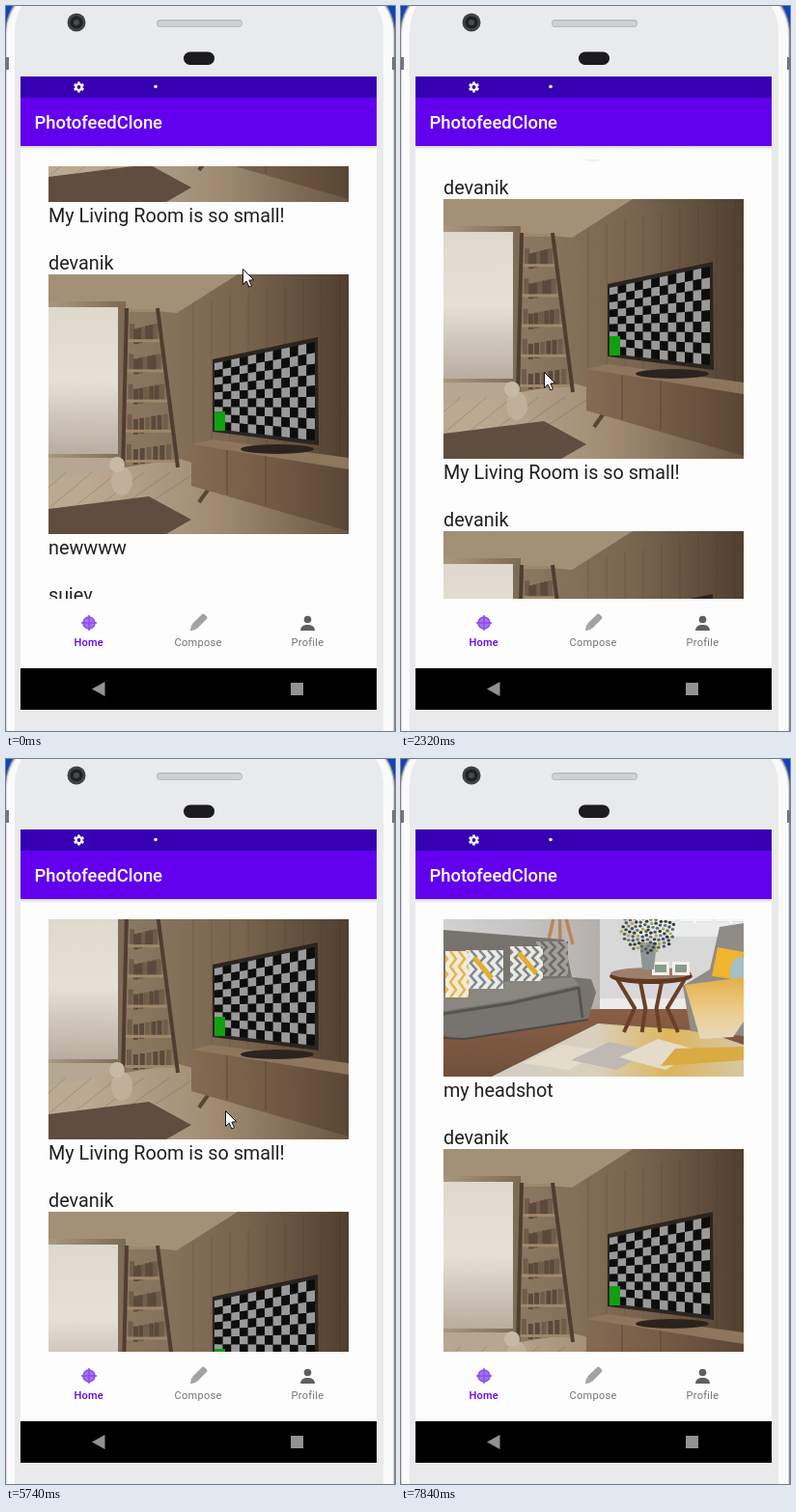
Recreate the animation shown at these times as an HTML page with a canvas. Size 403x751 px, loop 7990 ms.

```html
<!DOCTYPE html>
<html lang="en">
<head>
<meta charset="utf-8">
<title>Photo feed</title>
<style>
html, body { margin: 0; width: 100%; height: 100%; overflow: hidden; background: #e9eaec; }
canvas { display: block; width: 403px; height: 751px; }
</style>
</head>
<body>
<canvas id="stage" width="403" height="751"></canvas>
<script>
const LOOP = 7990, IMG_W = 311, IMG_H = 269, PITCH = 344, LEFT = 44;
const stage = document.getElementById('stage').getContext('2d');
let g = stage;

// ---------- drawing helpers ----------
const mix = (a, b, k) => a + (b - a) * k;
function repeat(n, paint) { for (let i = 0; i < n; i++) paint(i, i / (n - 1)); }
function rect(x, y, w, h, fill) { g.fillStyle = fill; g.fillRect(x, y, w, h); }
function tracePath(points) {
  g.beginPath();
  for (let i = 0; i < points.length; i += 2) g.lineTo(points[i], points[i + 1]);
}
function poly(fill, ...points) { tracePath(points); g.closePath(); g.fillStyle = fill; g.fill(); }
function line(color, width, ...points) {
  tracePath(points);
  g.strokeStyle = color; g.lineWidth = width; g.stroke();
}
function oval(x, y, rx, ry, fill) {
  g.beginPath(); g.ellipse(x, y, rx, ry, 0, 0, 7); g.fillStyle = fill; g.fill();
}
function round(x, y, w, h, r, fill) {
  g.beginPath(); g.roundRect(x, y, w, h, r); g.fillStyle = fill; g.fill();
}
function shade(x0, y0, x1, y1, ...colors) {
  const grad = g.createLinearGradient(x0, y0, x1, y1);
  colors.forEach((c, i) => grad.addColorStop(i / (colors.length - 1), c));
  return grad;
}
function label(text, x, y, font, color, spacing = 0) {
  g.font = font + ' Roboto, sans-serif';
  g.letterSpacing = spacing + 'px';
  g.fillStyle = color;
  g.fillText(text, x, y);
}
function clipped(x, y, w, h, paint) {
  g.save();
  g.beginPath(); g.rect(x, y, w, h); g.clip();
  paint();
  g.restore();
}
function offscreen(w, h, paint) {
  const c = document.createElement('canvas');
  c.width = w; c.height = h;
  g = c.getContext('2d');
  paint();
  g = stage;
  return c;
}

// ---------- pictures ----------
function paintTvRoom() {
  rect(0, 0, IMG_W, IMG_H, shade(90, 0, 311, 0, '#8b7760', '#79644e', '#513f30'));
  poly('#a39077', 0, 0, 196, 0, 133, 40, 0, 28);
  repeat(9, i => line('rgba(50,35,22,.15)', 1, 150 + i * 19, 30 - i * 4, 150 + i * 19, 190));
  rect(0, 28, 80, 190, shade(0, 0, 80, 0, '#a8987f', '#7c6953'));
  rect(0, 34, 72, 152, shade(0, 34, 0, 186, '#ded8cd', '#e6e0d6', '#b8ad9f'));
  rect(0, 190, 76, 26, '#b5a792');

  // floor and rug
  poly(shade(40, 0, 311, 0, '#bbaa92', '#a08b72', '#6b5643'), 0, 213, 135, 191, 311, 240, 311, 269, 0, 269);
  repeat(6, i => line('rgba(90,70,50,.25)', 1, i * 27 - 25, 243 - i * 2, i * 27 + 18, 205));
  poly('#5f4e3f', 0, 243, 104, 230, 148, 254, 122, 269, 0, 269);

  // ladder shelf with books
  repeat(6, (i, k) => {
    const y = mix(36, 192, k), left = mix(81, 77, k), width = mix(31, 56, k);
    if (i) repeat(7, b => rect(left + 4 + b * (width - 8) / 7, y - 16 + b * 5 % 6, 5, 16, b % 3 ? '#5b493b' : '#705c49'));
    rect(left, y, width, 3, '#a08769');
  });
  line('#4f3e30', 4, 81, 35, 77, 204);
  line('#4f3e30', 4, 113, 35, 134, 200);

  // cat
  oval(76, 214, 11, 15, '#c0b09a');
  oval(71, 197, 8, 8, '#c8b9a4');

  // cabinet
  line('#5a4633', 4, 166, 222, 156, 236);
  poly(shade(148, 0, 311, 0, '#846b52', '#735b45', '#5b4635'), 148, 176, 311, 200, 311, 266, 148, 219);
  poly('#8e765d', 148, 176, 170, 171, 311, 190, 311, 202);
  repeat(2, i => line('#5d4835', 1, 185 + i * 40, 182 + i * 6, 185 + i * 40, 228 + i * 11));

  // television
  oval(237, 181, 38, 5, '#2b231e');
  poly('#2b2521', 170, 88, 279, 65, 280, 177, 170, 163);
  const at = (u, v) => [172 + 104 * u, mix(92 - 22 * u, 160 + 12 * u, v)];
  const cols = 12, rows = 9;
  repeat(cols * rows, n => {
    const c = n % cols, r = (n - c) / cols;
    const [a, b, d, e] = [c / cols, (c + 1) / cols, r / rows, (r + 1) / rows];
    poly((c + r) % 2 ? '#0d0d0d' : '#999', ...at(a, d), ...at(b, d), ...at(b, e), ...at(a, e));
  });
  rect(172, 142, 11, 20, '#10a010');
}

function cushion(fill, mark, x, y, w, h) {
  clipped(x, y, w, h, () => {
    rect(x, y, w, h, fill);
    repeat(5, k => {
      const zig = [];
      repeat(7, i => zig.push(x - 4 + k * 9 + i % 2 * 6, y + i * h / 6));
      line(mark, 2.5, ...zig);
    });
  });
}

function paintLounge() {
  rect(0, 0, 162, IMG_H, shade(0, 0, 162, 0, '#d3d2d1', '#c6c4c2', '#b3afac'));
  rect(162, 0, 149, 200, '#d9d8d9');
  rect(162, 188, 149, 11, '#ebebea');
  [[-4, 9, 30, 53], [33, 15, 42, 51]].forEach(([x, y, w, h]) => {
    rect(x, y, w, h, '#333536');
    rect(x + 2, y + 2, w - 4, h - 4, '#ecedea');
    rect(x + w * .25, y + h * .28, w * .5, h * .45, '#76927c');
  });

  // window with shutters
  rect(200, 0, 111, 124, '#e9ebed');
  repeat(3, i => {
    const x = 208 + i * 37;
    rect(x, 0, 32, 34, '#ccd8c9');
    rect(x, 37, 32, 72, '#dde2e7');
    repeat(18, k => rect(x, 38 + k * 4, 32, 2, '#f4f6f7'));
    rect(x + 14, 0, 3, 110, '#fafafa');
  });

  // radiator and lamp
  repeat(5, i => { rect(111 + i * 6, 12, 4, 68, '#e9e9e7'); rect(115 + i * 6, 13, 2, 67, '#817d7a'); });
  repeat(3, i => line('#b9875a', 3.5, 120, 78, 108 + i * 13, 132));
  poly('#a9a9ae', 104, 51, 139, 51, 146, 78, 97, 78);
  repeat(11, (i, k) => line('#cfcfd4', 1, mix(105, 138, k), 51, mix(98, 145, k), 78));

  // wooden floor and patchwork rug
  poly(shade(0, 195, 0, 269, '#8a6046', '#70503b'), 0, 208, 155, 199, 311, 199, 311, 269, 0, 269);
  poly(shade(80, 0, 311, 0, '#d3cdc3', '#d9d0bd', '#ddb65c', '#d6c7a4'), 50, 269, 160, 214, 270, 222, 311, 236, 311, 269);
  repeat(3, i => poly(i % 2 ? '#bfb9b2' : '#e3dccb', 82 + i * 50, 255 - i * 3, 122 + i * 50, 236 - i * 3, 165 + i * 50, 242, 130 + i * 50, 262));
  poly('#d9ab42', 240, 240, 311, 238, 311, 252, 225, 258);

  // sofa
  poly('#77736e', 0, 117, 125, 127, 133, 166, 153, 168, 158, 182, 150, 209, 20, 231, 0, 226);
  poly('#8a8680', 0, 182, 60, 171, 134, 166, 140, 174, 70, 190, 0, 201);
  line('#57534f', 3, 0, 204, 70, 193, 140, 177, 144, 208);
  line('#4d4945', 2, 0, 229, 22, 230, 150, 210);
  cushion('#a3a09b', '#6f6c69', 96, 129, 33, 36);
  cushion('#eeeadf', '#7d858b', 69, 134, 34, 36);
  cushion('#ecece6', '#818a92', 23, 138, 39, 40);
  cushion('#f1ead8', '#e5b64a', 2, 139, 24, 48);
  repeat(2, i => line('#e3ad32', 5, 32 + i * 46, 146 - i * 5, 50 + i * 46, 167 - i * 5));

  // armchair with throw
  poly('#8f8c87', 311, 110, 286, 114, 276, 158, 248, 175, 256, 222, 311, 227);
  poly('#f0b42e', 284, 135, 311, 140, 308, 169, 278, 165);
  oval(307, 161, 10, 16, '#a4c0c4');
  poly(shade(0, 168, 0, 228, '#e3b14b', '#eccb86', '#e6d8bc'), 250, 174, 311, 166, 311, 212, 300, 228, 266, 230);

  // coffee table
  repeat(4, (i, k) => line('#6b4026', 4, mix(180, 250, k), 168, mix(198, 232, k), 198, mix(187, 243, k), 223));
  oval(215, 165, 43, 8, '#61381f');
  oval(215, 162, 42, 6, '#9c7f6b');
  repeat(2, i => { rect(216 + i * 21, 150, 18, 14, '#f3f1ec'); rect(219 + i * 21, 153, 12, 8, '#8a9b8e'); });

  // flowers
  poly('#8c9696', 203, 130, 221, 130, 218, 158, 206, 158);
  const petals = ['#3c4a38', '#5b6950', '#46507e', '#2c3c34', '#b9a64c', '#707c66'];
  repeat(110, i => {
    const a = i * 2.4, r = Math.sqrt(i) * 2.7;
    oval(212 + Math.cos(a) * r, 117 + Math.sin(a) * r * .85, 1.8, 1.6, petals[i % 6]);
  });
}

// ---------- phone ----------
function paintPhone() {
  rect(0, 0, 403, 751, '#0b45c4');
  ['#8f8a8b', '#dcdadb', '#fafafa'].forEach((c, i) => round(i - 1, i - 25, 404 - i * 2, 900, 53, c));
  round(9, -22, 382, 900, 48, '#e9eaec');
  [0, 400].forEach(x => rect(x, 53, 3, 13, '#777476'));

  [['#404143', 9.5], ['#202123', 6.5], ['#4a4b50', 3]].forEach(([c, r]) => oval(73, 17, r, r, c));
  round(156, 14, 89, 8, 4, '#b9babc');
  round(157, 15.5, 87, 5.5, 2.5, '#d0d1d2');
  round(184, 47.5, 32, 13.5, 6.7, '#1c1c1e');

  rect(15, 73, 369, 656, '#fdfdfd');
  rect(15, 73, 369, 22, '#3700b3');
  rect(15, 95, 369, 50, '#6200ee');
  rect(15, 145, 369, 4, shade(0, 145, 0, 149, '#d2d2d2', '#fdfdfd'));
  label('PhotofeedClone', 29.5, 127, '500 18.4px', '#fff');

  // settings gear and notification dot
  g.save();
  g.translate(75.5, 84);
  repeat(6, () => { g.rotate(Math.PI / 3); rect(-1.3, -5.5, 2.6, 3, '#fff'); });
  oval(0, 0, 4, 4, '#fff');
  oval(0, 0, 1.9, 1.9, '#3700b3');
  g.restore();
  oval(155, 83.5, 1.8, 1.8, '#fff');

  // tabs
  oval(86, 639, 6, 6, '#a474f3');
  line('#8a4cf0', 1.5, 78, 639, 94, 639);
  line('#8a4cf0', 1.5, 86, 631, 86, 647);
  g.beginPath(); g.arc(86, 639, 6, 0, 7); g.stroke();
  g.save();
  g.translate(199, 639); g.rotate(-Math.PI / 4);
  round(-6, -3.5, 17, 7, 2, '#a2a2a2');
  poly('#a2a2a2', -6, -3.5, -11.5, 0, -6, 3.5);
  g.restore();
  oval(312.5, 635.5, 3.8, 3.8, '#5f5f5f');
  round(305, 641, 15, 6, [6, 6, 0, 0], '#5f5f5f');
  label('Home', 70.5, 663, '500 11px', '#6200ee', .2);
  label('Compose', 174.5, 663, '11px', '#737373', .3);
  label('Profile', 295.5, 663, '11px', '#737373', .3);

  rect(15, 686, 369, 43, '#000');
  poly('#929292', 89, 707.5, 102.5, 700, 102.5, 715);
  rect(295, 701, 13, 13, '#929292');
}

const phone = offscreen(403, 751, paintPhone);
const tvRoom = offscreen(IMG_W, IMG_H, paintTvRoom);
const lounge = offscreen(IMG_W, IMG_H, paintLounge);
const posts = [
  ['devanik', tvRoom, 'My Living Room is so small!'],
  ['devanik', tvRoom, 'newwww'],
  ['sujev', lounge, 'my headshot'],
  ['devanik', tvRoom, 'My Living Room is so small!']
];

// ---------- motion ----------
const FEED_TOP = 200, FEED_END = -384;
const hold = x => Math.min(1, Math.max(0, x));
const ease = k => k * k * (3 - 2 * k);
const during = (t, from, to) => hold((t - from) / (to - from));
const swell = (t, from, to) => Math.sin(Math.PI * during(t, from, to));

const TICK = 137.5, FIRST = 120;
const snap = t => Math.max(0, FIRST + TICK * Math.floor((t - FIRST + 20) / TICK));

function feedOffset(t) {
  const flings = [[0, 1360, FEED_END], [1495, 2030, FEED_TOP], [5600, 6300, FEED_END], [7300, 7820, -628]];
  return flings.reduce((y, [from, to, target]) => mix(y, target, ease(during(t, from, to))), -66);
}

// Pointer stops as [arrival time, x, y].
const stops = [[0, 245, 272], [400, 239, 390], [1220, 222, 105], [1500, 222, 105], [1900, 178, 729],
  [2320, 148, 379], [2880, 168, 707], [3860, 168, 707], [4650, 256, 321], [5600, 228, 440],
  [5757, 227, 364], [5870, 226, 83], [6740, 230, 368], [7020, 208, 369], [7300, 208, 369], [7820, 224, 176]];
function pointerAt(t) {
  const i = Math.max(1, stops.findIndex(s => s[0] >= t));
  const [from, x0, y0] = stops[i - 1], [to, x1, y1] = stops[i];
  const k = ease(during(t, from, to));
  return [mix(x0, x1, k), mix(y0, y1, k)];
}

function drawFeed(offset) {
  clipped(37, 166, 326, 448, () => posts.forEach(([author, image, caption], i) => {
    const top = Math.round(offset) + i * PITCH;
    label(author, LEFT, top - 5, '19.8px', '#202020');
    g.drawImage(image, LEFT, top);
    label(caption, LEFT, top + IMG_H + 21, '19.8px', '#202020');
  }));
}

function drawGlow(t) {
  const strength = swell(t, 1100, 1900) + .8 * swell(t, 6200, 6740);
  clipped(37, 560, 326, 54, () =>
    oval(210, 614 - 44 * strength + 430, 430, 430, `rgba(98,0,238,${.15 * strength})`));
}

function drawSpinner(t) {
  const size = 1 - during(t, 3360, 3560);
  if (t < 2300 || size <= 0) return;
  const y = mix(141, 198, ease(during(t, 2320, 2880))) + 17 * swell(t, 2600, 3290);
  clipped(37, 159, 326, 455, () => {
    g.translate(199, y); g.scale(size, size);
    g.shadowColor = 'rgba(0,0,0,.2)'; g.shadowBlur = 3;
    oval(0, 0, 18.5, 18.5, '#fafafa');
    g.shadowColor = 'transparent';
    g.beginPath(); g.arc(0, 0, 7.5, t / 130, t / 130 + 4.4);
    g.strokeStyle = '#222'; g.lineWidth = 2.2; g.stroke();
  });
}

function drawPointer(t) {
  if (t > 7800) return;
  const [x, y] = pointerAt(t);
  g.save();
  g.translate(Math.round(x) + .5, Math.round(y) + .5);
  poly('#fff', 0, 0, 0, 16, 3.7, 12.6, 6.3, 18.5, 9, 17.3, 6.4, 11.6, 11.2, 11.2);
  g.strokeStyle = '#111'; g.lineWidth = 1; g.stroke();
  g.restore();
}

function draw(now) {
  const t = snap(now % LOOP);
  g.drawImage(phone, 0, 0);
  drawFeed(feedOffset(t));
  drawGlow(t);
  drawSpinner(t);
  drawPointer(t);
}

let start;
function tick(now) {
  start ??= now;
  draw(now - start);
  requestAnimationFrame(tick);
}
draw(0);
requestAnimationFrame(tick);
</script>
</body>
</html>
```
